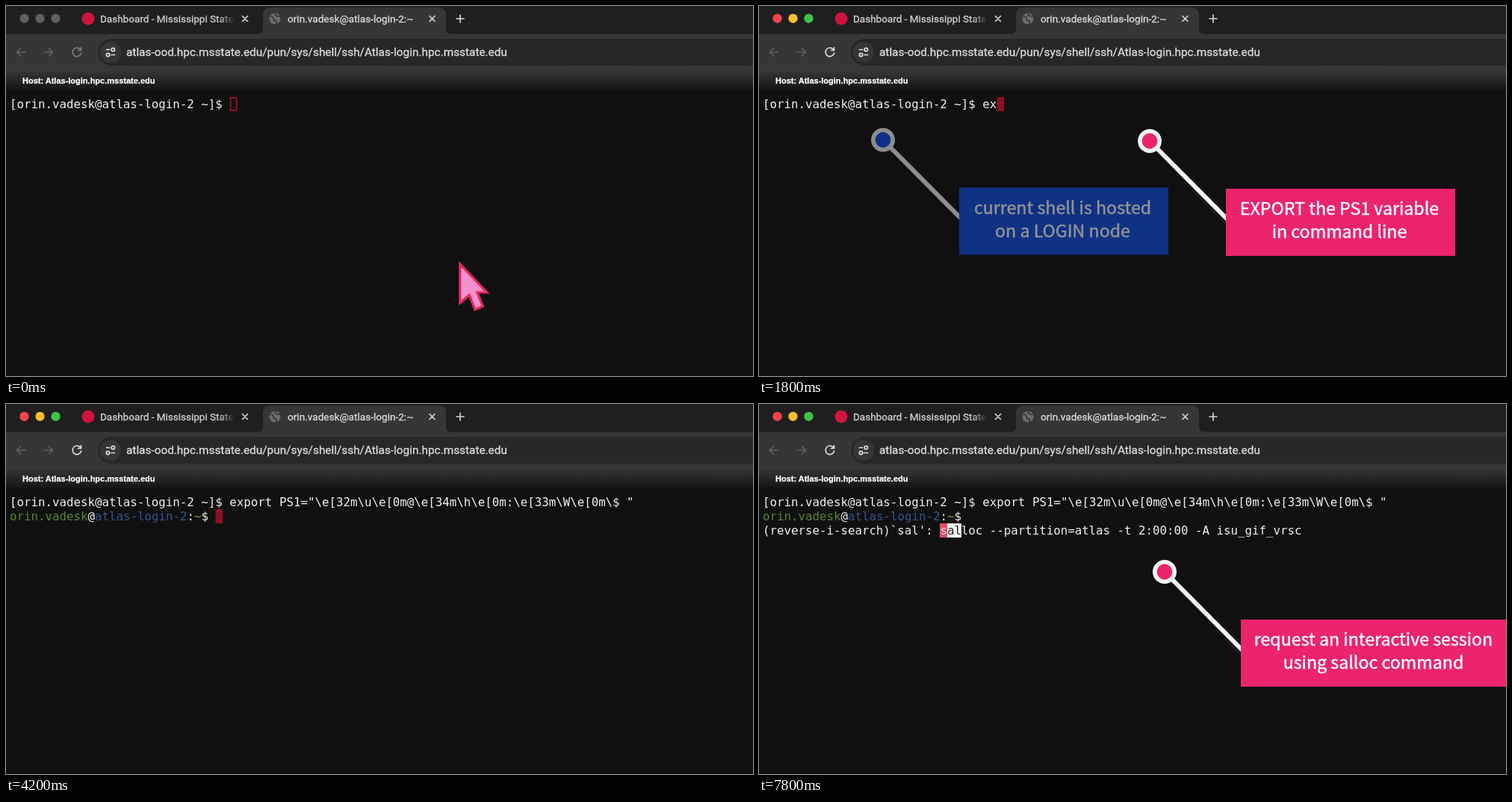
An HTML page for the animation above (8 s loop, 1000 by 496 pixels).

```html
<!DOCTYPE html>
<html lang="en">
<head>
<meta charset="utf-8">
<title>Shell prompt walkthrough</title>
<style>
  html, body { margin: 0; width: 100%; height: 100%; overflow: hidden; background: #101010; }
  svg { display: block; width: 100%; height: 100%; }
  text { white-space: pre; }
  .ui { font-family: Roboto, sans-serif; fill: #dcdcdc; stroke: #dcdcdc; stroke-width: .3; }
  .host { font: bold 11px "Liberation Sans", Arial, sans-serif; fill: #fff; stroke: #fff; stroke-width: .25; }
  .term { font: 15.78px "DejaVu Sans Mono", monospace; }
  .note { font: 23.2px "Noto Sans CJK JP", "Noto Sans CJK SC", "Noto Sans CJK", "Noto Sans", sans-serif; fill: #fff; stroke: #fff; stroke-width: .45; text-anchor: middle; }
  .title { font-family: Inter, sans-serif; text-anchor: middle; }
  .line { fill: none; stroke-width: 1.7; stroke-linecap: round; stroke-linejoin: round; }
</style>
</head>
<body>
<svg viewBox="0 0 1000 496" preserveAspectRatio="none">
  <defs>
    <linearGradient id="bar" x2="0" y2="1">
      <stop offset="0" stop-color="#3a3a3a"/>
      <stop offset="1" stop-color="#151515"/>
    </linearGradient>
    <linearGradient id="cut" gradientUnits="userSpaceOnUse" x1="284" x2="305" y1="0" y2="0">
      <stop offset="0" stop-color="#d0d0d0"/>
      <stop offset="1" stop-color="#d0d0d0" stop-opacity="0"/>
    </linearGradient>
  </defs>

  <rect width="1000" height="496" fill="#101010"/>
  <rect width="1000" height="38" fill="#1f1f20"/>
  <path d="M336 38q8 0 8-8V12q0-10 10-10H579q10 0 10 10V30q0 8 8 8Z" fill="#363637"/>
  <rect y="37.5" width="1000" height="46.5" fill="#363637"/>
  <rect x="123" y="44" width="900" height="36" rx="18" fill="#272728"/>
  <rect y="84" width="1000" height="28.5" fill="url(#bar)"/>

  <g id="lights"></g>
  <circle cx="110" cy="17" r="8.5" fill="#d0143f"/>
  <text class="ui" x="126" y="21.5" font-size="13.5" style="fill:url(#cut);stroke:url(#cut)">Dashboard - Mississippi State</text>
  <circle cx="360" cy="17" r="7.5" fill="#6c6c6e"/>
  <path class="line" stroke="#363637" d="M354 14q4 0 4 3t4 3v4M360 10q0 4 6 4"/>
  <text class="ui" x="377" y="21.5" font-size="13.6" id="tab"></text>
  <path class="line" stroke="#d4d4d4" d="M316.5 13.5l7 7m0-7l-7 7M567 13.5l7 7m0-7l-7 7M603 17h10m-5-5v10"/>

  <path class="line" stroke="#626264" d="M26 62H14.5m5-5l-5 5 5 5M51 62h11.5m-5-5l5 5-5 5"/>
  <path class="line" id="reload" d="M100 59a5.8 5.8 0 1 0 .6 4M100.5 55.5v4h-4"/>
  <circle cx="140" cy="62" r="14" fill="#363638"/>
  <path class="line" stroke="#e0e0e0" d="M134.5 58.5h4M141 65.5h4.5"/>
  <g fill="none" stroke="#e0e0e0" stroke-width="1.7">
    <circle cx="143.3" cy="58.5" r="2.2"/><circle cx="136.5" cy="65.5" r="2.2"/>
  </g>
  <text class="ui" x="161" y="67" font-size="15.37">atlas-ood.hpc.msstate.edu/pun/sys/shell/ssh/Atlas-login.hpc.msstate.edu</text>
  <text class="host" x="22" y="104">Host: Atlas-login.hpc.msstate.edu</text>

  <g id="term" class="term"></g>
  <g id="notes"></g>
  <g id="title" class="title">
    <path d="M334 200h7v137h-7zM663 200h7v137h-7z" fill="#ffe014"/>
    <text x="500.5" y="257" font-size="46" font-weight="800" fill="#fff">prompt</text>
    <text x="502" y="306" font-size="44.8" font-style="italic" font-weight="300" fill="#f5dc1e">(has changed)</text>
  </g>
  <path id="pointer" d="M0 0V52L12.5 41.5 20 61 30.5 56.5 23 38H36Z" fill="#f390cf" stroke="#e6265c" stroke-width="3.2"/>
</svg>

<script>
const LOOP = 8000, STEP = 200, COL = 9.5, LEFT = 5;
const USER = 'orin.vadesk', NODE = 'atlas-login-2';
const EXPORT = 'export ';
const PS1 = 'PS1="\\e[32m\\u\\e[0m@\\e[34m\\h\\e[0m:\\e[33m\\W\\e[0m\\$ "';
const SALLOC = 'salloc --partition=atlas -t 2:00:00 -A isu_gif_vrsc';
const INK = '#f0f0f0', RED = '#8c1124';

const $ = id => document.getElementById(id);
const clamp = v => Math.max(0, Math.min(1, v));
const fade = (t, start) => clamp((t - start) / 600);

// Callouts: dot position, box width, colour, text, fade-in and fade-out start
const notes = [
  { x: 166, y: 179.5, w: 280, fill: '#104ee4', rows: ['current shell is hosted', 'on a LOGIN node'], from: 0, to: 1530 },
  { x: 523, y: 181, w: 307, fill: '#ec246e', rows: ['EXPORT the PS1 variable', 'in command line'], from: 1200, to: 3220 },
  { x: 543, y: 225, w: 358, fill: '#ec246e', rows: ['request an interactive session', 'using salloc command'], from: 6580, to: LOOP }
];

$('tab').textContent = `${USER}@${NODE}:~`;
$('notes').innerHTML = notes.map(n => `<g transform="translate(${n.x} ${n.y})">
  <path d="M0 0L104 105" stroke="#f4f4f4" stroke-width="6"/>
  <circle r="13.2" fill="${n.fill}" stroke="#f4f4f4" stroke-width="5.6"/>
  <rect x="102" y="64" width="${n.w}" height="90" fill="${n.fill}"/>
  ${n.rows.map((s, i) => `<text class="note" x="${100.5 + n.w / 2}" y="${99.3 + 30.7 * i}">${s}</text>`).join('')}
</g>`).join('');

const rowY = row => 122 + 19 * row;
const block = (row, col, len, attrs) =>
  `<rect x="${LEFT + col * COL}" y="${rowY(row)}" width="${len * COL}" height="19" ${attrs}/>`;
const put = (row, col, s, fill = INK) =>
  `<text x="${LEFT + col * COL}" y="${rowY(row) + 14.5}" fill="${fill}">${s}</text>`;

function runs(row, parts) {
  let col = 0, out = '';
  for (const [s, fill] of parts) {
    out += put(row, col, s, fill);
    col += s.length;
  }
  return out;
}

const OLD = `[${USER}@${NODE} ~]$ `;
const NEW = [[USER, '#5a862e'], ['@'], [NODE, '#34558f'], [':'], ['~', '#a58f35'], ['$ ']];
const NEW_LEN = NEW.reduce((n, p) => n + p[0].length, 0);

function cursor(row, col, t) {
  if (t < 200) {
    return `<rect x="${LEFT + col * COL + 1}" y="${rowY(row) + 1}" width="8" height="17" fill="none" stroke="${RED}" stroke-width="2"/>`;
  }
  const off = t >= 600 && t < 1200;
  return block(row, col, 1, `fill="${RED}" opacity="${off ? 0.2 : 1}"`);
}

function search(row, key) {
  const head = `(reverse-i-search)\`${key}': `;
  if (!key) return put(row, 0, head) + cursor(row, head.length, LOOP);
  const at = SALLOC.lastIndexOf(key), col = head.length + at;
  return put(row, 0, head + SALLOC) +
    block(row, col, key.length, 'fill="#f4f4f4"') +
    block(row, col, 1, 'fill="#ef4666"') +
    put(row, col, key[0], '#ffe3e8') + put(row, col + 1, key.slice(1), '#222');
}

function terminal(t) {
  const typed = EXPORT.slice(0, Math.max(0, Math.round((t - 1400) / 200)));
  const pasted = t >= 3000, entered = t >= 4200;
  const col = OLD.length + typed.length;
  let out = put(0, 0, OLD + typed);
  if (pasted) {
    if (!entered) out += block(0, col, PS1.length, 'fill="#ededed"');
    out += put(0, col, PS1, entered ? INK : '#252525');
  }
  if (!entered) return out + cursor(0, col + (pasted ? PS1.length : 0), t);

  out += runs(1, NEW);
  if (t < 4800) return out + cursor(1, NEW_LEN, t);
  if (t < 6400) return out + runs(2, NEW) + cursor(2, NEW_LEN, t);
  return out + search(2, t < 6800 ? '' : t < 7000 ? 's' : t < 7600 ? 'sa' : 'sal');
}

function draw(t) {
  const active = t >= 200;
  const colors = active ? ['#f9434d', '#f9bd2e', '#3fc445'] : Array(3).fill('#606062');
  $('lights').innerHTML = colors.map((c, i) => `<circle cx="${24.5 + 21 * i}" cy="16.7" r="6.2" fill="${c}"/>`).join('');
  $('reload').setAttribute('stroke', active ? '#dadada' : '#7c7c7e');
  $('term').innerHTML = terminal(t);

  notes.forEach((n, i) => $('notes').children[i].setAttribute('opacity', fade(t, n.from) - fade(t, n.to)));
  $('title').setAttribute('opacity', fade(t, 4600) - fade(t, 5900));

  const move = fade(t, 0);
  $('pointer').setAttribute('transform', `translate(${607.8 - 34 * move} ${346 - 16 * move})`);
  $('pointer').setAttribute('opacity', t < 1400 ? 1 : 0);
}

let last = -1;
function tick(now) {
  const t = Math.floor(now % LOOP / STEP) * STEP;
  if (t !== last) draw(last = t);
  requestAnimationFrame(tick);
}
draw(0);
requestAnimationFrame(tick);
</script>
</body>
</html>
```
